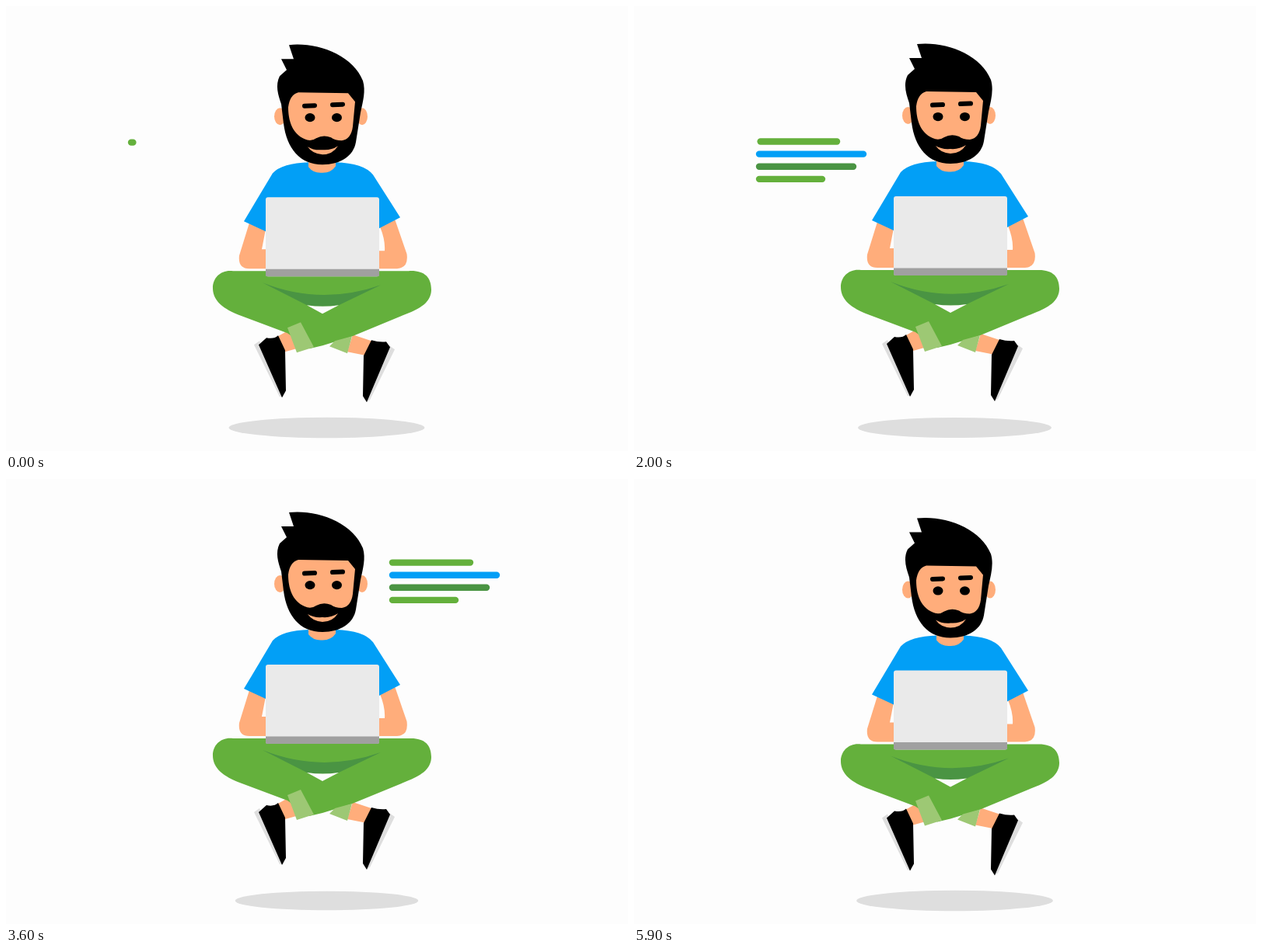
These frames come from a looping animation (800x573 px, 6 s). An HTML page:

```html
<!DOCTYPE html>
<html lang="en">
<head>
<meta charset="utf-8">
<title>Floating coder</title>
<style>
  html, body { margin: 0; height: 100%; overflow: hidden; background: #fdfdfd; }
  svg { display: block; width: 100vw; height: 100vh; }
  .skin { fill: #ffad7b; }
  .green { fill: #64b03c; }
  .dark { fill: #4a9443; }
  .cuff { fill: #9dc874; }
  .sole { fill: #dedede; }
  #lines { stroke-width: 8.4; stroke-linecap: round; }
</style>
</head>
<body>
<svg viewBox="0 0 800 573">
  <ellipse id="shadow" cx="412.5" cy="543" fill="#dedede"/>
  <g id="floater">
    <g id="lines"></g>

    <!-- feet -->
    <path class="skin" d="M348 427 366 417 377 441 359 446ZM446 424 470 432 464 451 439 446Z"/>
    <path class="sole" d="M326 432 319 437 352 504 357 504ZM493 438 500 443 468 508 463 510Z"/>
    <path d="M325 437 335 428Q345 430 350 425L359 444 360 496 355 505Z
             M470 431Q480 434 489 433L494 440 464 511 459 503 460 451Z"/>

    <!-- legs -->
    <path class="green" d="M292 342H518C538 341 547 350 547 366C547 380 536 389 518 396L443 427 407 438 390 442
      362 422 298 398C276 389 266 378 266 364C266 350 277 340 292 342Z"/>
    <path class="dark" d="M330 357Q405 387 482 360L428 386Q407 389 387 386Z"/>
    <path fill="#fdfdfd" d="M387 386Q407 389 428 386L407 397Z"/>
    <path class="cuff" d="M362 415 379 408 396 440 374 447ZM423 432 445 426 439 448 416 439Z"/>

    <!-- arms and shirt -->
    <path class="skin" d="M313 280 300 322Q298 339 313 339H335V314H329L334 288Z
                          M500 275 515.500 320Q518 338 503 339H479V316H487Q488 302 481 285Z"/>
    <path fill="#029ff6" d="M390 202Q355 203 343 216L306 278 334 291H480V287L507 273 472 218Q460 203 424 202Z"/>
    <path class="skin" d="M389 198H424V207Q418 216 406 215.500Q395 216 389 208Z"/>

    <!-- head -->
    <ellipse class="skin" cx="352.500" cy="143" rx="7.500" ry="11"/>
    <ellipse class="skin" cx="458" cy="143" rx="7" ry="11"/>
    <path d="M364 51C400 47 446 64 459 97C463 110 459 124 456 138L450 176C447 194 430 205 407 205
      C378 205 361 184 357 152L354 127C350 115 346 103 352 91L361 83 354 69H370Z"/>
    <path class="skin" d="M376 112 440 113 449 124 446 156Q444 172 432 174Q423 174 418 170Q408 166 399 171
      Q392 176 384 172C368 165 363 148 363 131Q365 115 376 112Z"/>
    <path class="skin" d="M388 182Q396 187 407 186Q418 187 427 181Q420 192 407 192Q394 191 388 182Z"/>
    <path fill="none" stroke="#000" stroke-width="6" stroke-linecap="round" d="M384 129.500 397 129M420 128 433 127.500"/>
    <ellipse class="eye" cx="391" cy="144.500" rx="6.500"/>
    <ellipse class="eye" cx="425.500" cy="144.500" rx="6.500"/>

    <!-- laptop -->
    <rect x="334" y="247" width="146" height="102" rx="3" fill="#eaeaea"/>
    <path fill="#a0a0a0" d="M334 339.500H480V347Q480 349 478 349H336Q334 349 334 347Z"/>
  </g>
</svg>
<script>
const LOOP = 6000, LOW = 970, HALF = 1990;
const GROW = 250;
const COLORS = ['#64b03c', '#029ff6', '#4a9443', '#64b03c'];
const LENGTHS = [100, 134, 121, 81];
const blocks = [
  { x: 161, y: 176.5, growAt: -5, shrinkAt: 1995, shrink: 366 },
  { x: 497, y: 115.5, growAt: 2128, shrinkAt: 4163, shrink: 360 }
];

const byId = id => document.getElementById(id);
const set = (el, attrs) => Object.entries(attrs).forEach(([k, v]) => el.setAttribute(k, v));
const clamp = v => Math.min(1, Math.max(0, v));

const shadow = byId('shadow'), floater = byId('floater');
const eyes = document.querySelectorAll('.eye');
const lines = blocks.flatMap(block => LENGTHS.map((length, i) => {
  const el = document.createElementNS('http://www.w3.org/2000/svg', 'line');
  const y = block.y + i * 16.1;
  set(el, { y1: y, y2: y, stroke: COLORS[i] });
  byId('lines').append(el);
  return { el, length, i, ...block };
}));

// Lines type in one after another, then are wiped from the left in turn.
function drawLine({ el, x, length, i, growAt, shrinkAt, shrink }, t) {
  const end = clamp((t - growAt) / GROW - i);
  const start = clamp((t - shrinkAt) / shrink - i);
  set(el, {
    x1: x + length * start,
    x2: x + length * end,
    visibility: end - start > 0.01 ? 'visible' : 'hidden'
  });
}

function draw(t) {
  // height: 0 at the lowest point, 1 at the highest
  const phase = Math.abs(t - LOW) % (2 * HALF);
  const height = phase < HALF ? phase / HALF : 2 - phase / HALF;
  set(floater, { transform: `translate(0 ${12.3 - 33.5 * height ** 1.3})` });

  const rx = 110 + 45 * (1 - height) ** 1.55;
  set(shadow, { rx, ry: rx * 0.1045 });

  const open = Math.min(1, 0.1 + 0.9 * Math.abs(t - 4935) / 100);
  eyes.forEach(eye => set(eye, { ry: 5.6 * open }));
  lines.forEach(line => drawLine(line, t));
}

const begin = performance.now();
function tick() {
  draw((performance.now() - begin) % LOOP);
  requestAnimationFrame(tick);
}
tick();
</script>
</body>
</html>
```
